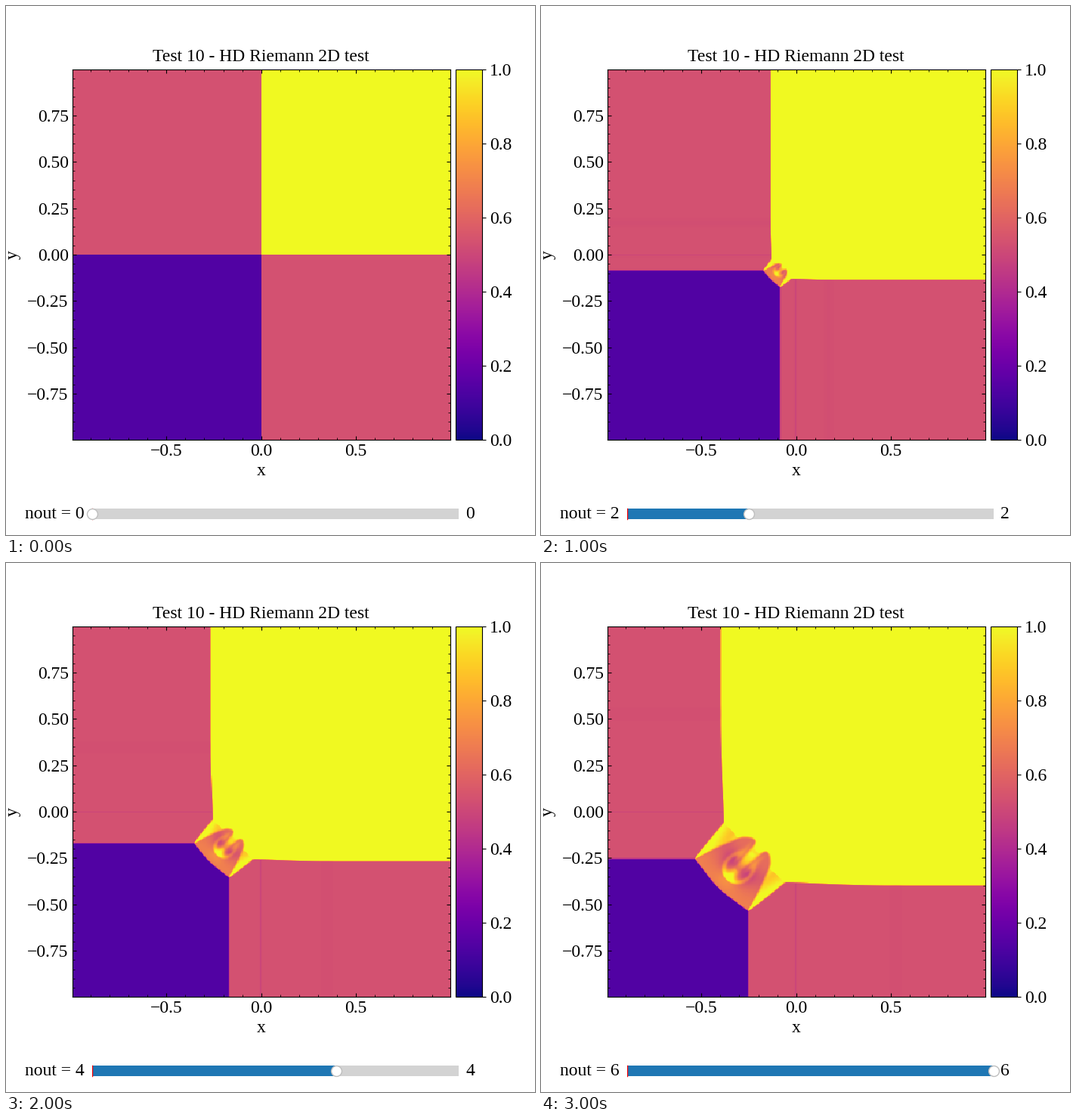
These frames come from a looping animation (700x700 px, 3.5 s). A matplotlib script:

```python
import matplotlib.pyplot as plt
import numpy as np
from matplotlib.animation import FuncAnimation
from matplotlib.patches import Rectangle
from matplotlib.ticker import AutoMinorLocator, MultipleLocator

FRAMES = 7
GAMMA = 1.4
CELLS = 400           # cells across the plotted square [-1, 1]
DX = 2 / CELLS
OUT_DT = 0.1          # time between outputs
STEPS = 100           # time steps per output
DT = OUT_DT / STEPS
GROW = 20             # cells the solved window gains per side and output
CORE = 6              # half width of the window at the start


# --- 2D Euler equations: limited linear reconstruction, HLLC, RK2 ---

def to_cons(q):
    rho, u, v, p = q
    energy = p / (GAMMA - 1) + 0.5 * rho * (u * u + v * v)
    return np.stack([rho, rho * u, rho * v, energy])


def to_prim(c):
    rho = np.maximum(c[0], 1e-4)
    u, v = c[1] / rho, c[2] / rho
    p = (GAMMA - 1) * (c[3] - 0.5 * rho * (u * u + v * v))
    return np.stack([rho, u, v, np.maximum(p, 1e-4)])


def slopes(q):
    """Monotonized central for density, van Leer for velocity, minmod for pressure."""
    d = np.diff(q, axis=1)
    a, b = d[:, :-1], d[:, 1:]
    same = a * b > 0
    s = np.zeros_like(a)

    def smaller(k):
        return np.minimum(np.abs(a[k]), np.abs(b[k]))

    mean = 0.5 * np.abs(a[0] + b[0])
    s[0] = np.sign(a[0]) * np.minimum(2 * smaller(0), mean) * same[0]
    va, vb, ok = a[1:3], b[1:3], same[1:3]
    s[1:3] = np.where(ok, 2 * va * vb / np.where(ok, va + vb, 1), 0)
    s[3] = np.sign(a[3]) * smaller(3) * same[3]
    return s


def hllc(left, right):
    rl, ul, _, pl = left
    rr, ur, _, pr = right
    cl, cr = np.sqrt(GAMMA * pl / rl), np.sqrt(GAMMA * pr / rr)
    sl = np.minimum(ul - cl, ur - cr)
    sr = np.maximum(ul + cl, ur + cr)
    ml, mr = rl * (sl - ul), rr * (sr - ur)
    sm = (pr - pl + ml * ul - mr * ur) / (ml - mr)

    # only the side upwind of the contact matters
    from_left = sm >= 0
    q = np.where(from_left, left, right)
    s = np.where(from_left, sl, sr)
    fan = np.where(from_left, np.minimum(sl, 0), np.maximum(sr, 0))

    rho, u, v, p = q
    c = to_cons(q)
    flux = c * u
    flux[1] += p
    flux[3] += p * u
    scale = rho * (s - u) / (s - sm)
    e_star = c[3] / rho + (sm - u) * (sm + p / (rho * (s - u)))
    star = scale * np.stack([np.ones_like(sm), sm, v, e_star])
    return flux + fan * (star - c)


def rate(c):
    q = to_prim(c)
    q = np.concatenate([q[:, :1], q[:, :1], q, q[:, -1:], q[:, -1:]], axis=1)
    half = 0.5 * slopes(q)
    mid = q[:, 1:-1]
    flux = hllc((mid + half)[:, :-1], (mid - half)[:, 1:])
    dx_part = np.diff(flux, axis=1) / -DX
    # the flow mirrors across the diagonal, so the y part is a transpose
    return dx_part + dx_part[[0, 2, 1, 3]].transpose(0, 2, 1)


def start_state():
    side = np.repeat([0, 1], CORE)
    i, j = np.meshgrid(side, side, indexing="ij")
    rho = np.array([[0.138, 0.5323], [0.5323, 1.5]])[i, j]
    p = np.array([[0.029, 0.3], [0.3, 1.5]])[i, j]
    return to_cons(np.stack([rho, 1.206 * (1 - i), 1.206 * (1 - j), p]).astype(np.float32))


def extend(a, cells):
    """Widen the last two axes; outside the window the flow is uniform across."""
    return np.pad(a, [(0, 0), (cells, cells), (cells, cells)], mode="edge")


def full_density(c):
    return extend(c[:1], (CELLS - c.shape[1]) // 2)[0].T


def solve():
    c = start_state()
    outputs = [full_density(c)]
    for _ in range(FRAMES - 1):
        c = extend(c, GROW)
        for _ in range(STEPS):
            c1 = c + DT * rate(c)
            c = 0.5 * (c + c1 + DT * rate(c1))
        outputs.append(full_density(c))
    return outputs


density = solve()

# --- figure ---

plt.rcParams.update({
    "font.family": "Liberation Serif",
    "font.size": 17,
    "axes.titlesize": 17,
})
W = H = 700
fig = plt.figure(figsize=(7, 7), dpi=100, facecolor="white")


def add_axes(x, y, w, h):
    return fig.add_axes([x / W, y / H, w / W, h / H])


ax = add_axes(87.5, 126, 500.47, 490)
x = -1 + DX * (np.arange(CELLS) + 0.5)
mesh = ax.pcolormesh(x, x, density[0], cmap="plasma", vmin=0, vmax=1, shading="nearest")
ax.set(xlim=(x[0], x[-1]), ylim=(x[0], x[-1]))
ax.set_title("Test 10 - HD Riemann 2D test", pad=8)
ax.set_xlabel("x")
ax.set_ylabel("y", labelpad=6)
ax.xaxis.set_major_locator(MultipleLocator(0.5))
ax.yaxis.set_major_locator(MultipleLocator(0.25))
ax.xaxis.set_minor_locator(AutoMinorLocator(5))
ax.yaxis.set_minor_locator(AutoMinorLocator(5))
ax.tick_params(which="both", direction="in", top=True, right=True)

cax = add_axes(594.97, 126, 35.03, 490)
fig.colorbar(mesh, cax=cax, ticks=MultipleLocator(0.2))

# slider
bar = add_axes(113.75, 14, 485, 28)
bar.set(xlim=(0, FRAMES - 1), ylim=(0, 1))
bar.axis("off")
bar.add_patch(Rectangle((0, 0.25), FRAMES - 1, 0.5, fc="lightgrey", ec="none"))
fill = bar.add_patch(Rectangle((0, 0.25), 0, 0.5, fc="C0", ec="none"))
bar.axvline(0, 0.25, 0.75, color="r", lw=1)
knob, = bar.plot([0], [0.5], "o", ms=10, mfc="white", mec="0.75", clip_on=False)
label = bar.text(-0.02, 0.5, "", transform=bar.transAxes, ha="right", va="center")
value = bar.text(1.02, 0.5, "", transform=bar.transAxes, ha="left", va="center")


def draw(n):
    mesh.set_array(density[n])
    fill.set_width(n)
    knob.set_xdata([n])
    label.set_text(f"nout = {n}")
    value.set_text(f"{n}")
    return mesh, fill, knob, label, value


anim = FuncAnimation(fig, draw, frames=FRAMES, interval=500, repeat=True, repeat_delay=0)
plt.show()
```
